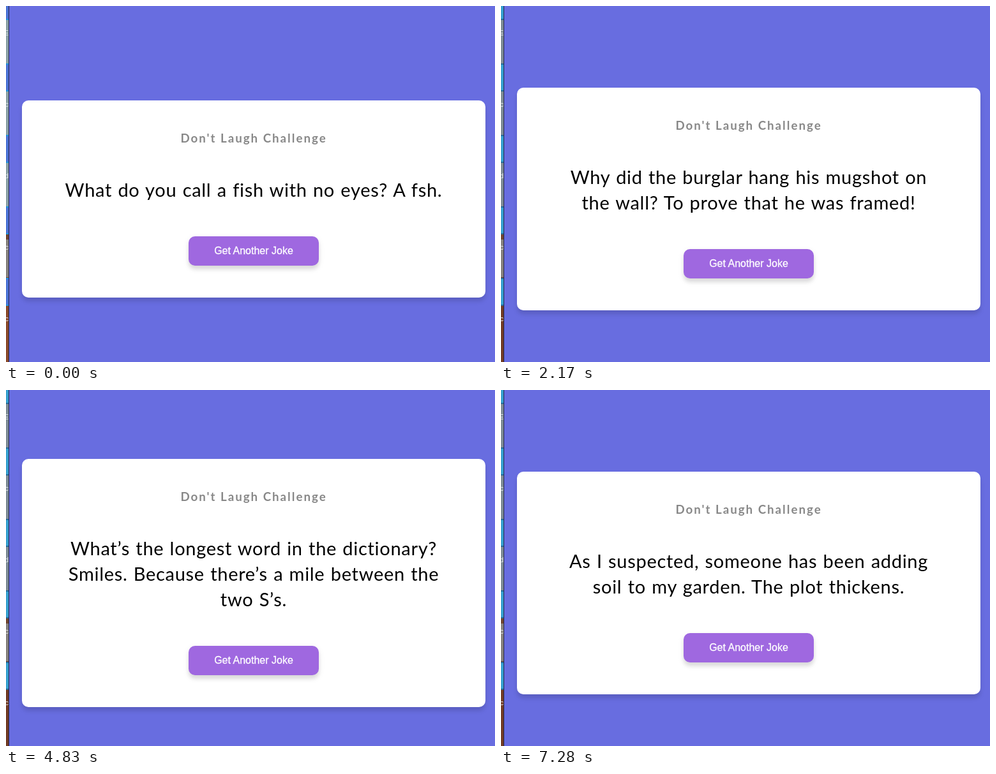
An HTML page that plays this animation: 766 by 558 pixels, repeating every 7.35 s.

```html
<!DOCTYPE html>
<html lang="en">
<head>
<meta charset="utf-8">
<title>Don't Laugh Challenge</title>
<style>
  html, body { margin: 0; width: 100%; height: 100%; overflow: hidden; background: #686de0; }
  svg { display: block; }
  text { text-anchor: middle; }
  #card { fill: #fff; filter: drop-shadow(0 6px 3px rgba(0,0,0,.13)); }
  #title { font: 700 18.72px Lato, sans-serif; letter-spacing: 2px; fill: #888; }
  #joke { font: 29px Lato, sans-serif; letter-spacing: .7px; word-spacing: 1.2px; }
  #button rect { fill: #9f68e0; filter: drop-shadow(0 6px 3px rgba(0,0,0,.1)) drop-shadow(0 3px 5px rgba(0,0,0,.07)); }
  #button text { font: 16px "Liberation Sans", Arial, sans-serif; fill: #fff; stroke: #fff; stroke-width: .3px; }
  #strip text { font: 11px "Liberation Sans", Arial, sans-serif; fill: #e4e8ec; text-anchor: end; }
</style>
</head>
<body>
<svg width="766" height="558" viewBox="0 0 766 558">
  <rect width="766" height="558" fill="#686de0"/>
  <g id="strip"></g>
  <rect id="card" x="25" width="726" rx="10"/>
  <text id="title" x="388">Don't Laugh Challenge</text>
  <g id="joke"></g>
  <g id="button">
    <rect x="286" width="204" height="46" rx="10"/>
    <text x="388" y="28">Get Another Joke</text>
  </g>
</svg>
<script>
const LOOP = 7350, CENTER_Y = 302.5, LINE = 40;
const jokes = [
  { at: 0, lines: ['What do you call a fish with no eyes? A fsh.'] },
  { at: 2170, lines: ['Why did the burglar hang his mugshot on',
                      'the wall? To prove that he was framed!'] },
  { at: 4830, lines: ['What’s the longest word in the dictionary?',
                      'Smiles. Because there’s a mile between the',
                      'two S’s.'] },
  { at: 6580, lines: ['As I suspected, someone has been adding',
                      'soil to my garden. The plot thickens.'] },
];
const $ = id => document.getElementById(id);

function showJoke({ lines }) {
  const height = 269 + LINE * lines.length;
  const top = CENTER_Y - height / 2;
  $('card').setAttribute('y', top);
  $('card').setAttribute('height', height);
  $('title').setAttribute('y', top + 66);
  $('joke').innerHTML = lines.map((line, i) =>
    `<text x="388" y="${top + 151 + LINE * i}">${line}</text>`).join('');
  $('button').setAttribute('transform', `translate(0 ${top + height - 96})`);
}

// Sliver of the desktop behind the window: folder icons with clipped labels.
function drawStrip(folder, edge, wall, floor) {
  const bar = (y, h, fill, x = 0, w = 4) =>
    `<rect x="${x}" y="${y}" width="${w}" height="${h}" fill="${fill}"/>`;
  let svg = bar(0, 357, wall) + bar(357, 9, '#70452f') +
            bar(366, 59, '#85817d') + bar(425, 133, floor);
  ['E', 'c', 'd', 'c', 'ac'].forEach((label, i) => {
    const y = i * 112 - 22;
    svg += bar(y, 44, folder) + bar(y, 2, edge) + bar(y + 42, 2, edge) +
           `<text x="4" y="${y + 68}">${label}</text>`;
  });
  $('strip').innerHTML = svg + bar(0, 558, '#24264a', 4, 1);
}

let joke, early;
function frame(now) {
  const t = now % LOOP;
  const current = jokes.findLast(j => j.at <= t);
  if (current !== joke) showJoke(joke = current);
  if (early !== t < 490) {
    early = t < 490;
    if (early) drawStrip('#4d74d6', '#1f95dd', '#8aa0a5', '#8a4a2a');
    else drawStrip('#36a0cf', '#256c9b', '#7d8b95', '#713b24');
  }
  requestAnimationFrame(frame);
}
frame(0);
</script>
</body>
</html>
```
